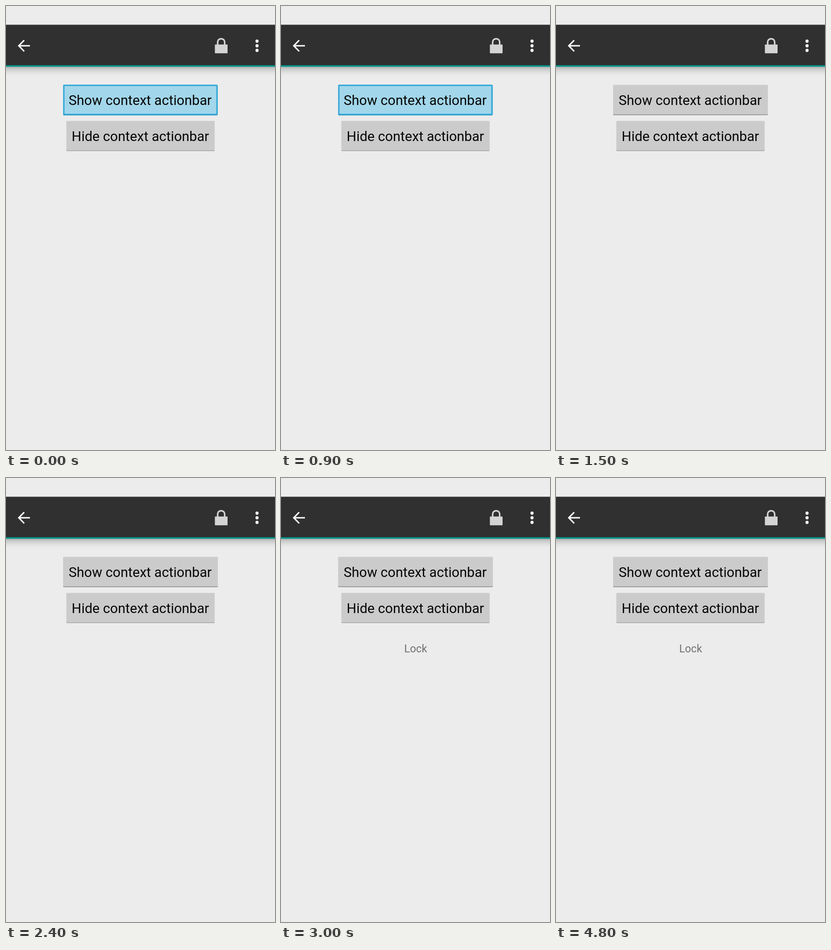
Write an HTML page that moves like this. It is 584 px wide and 960 px high and loops after 6 s.

```html
<!DOCTYPE html>
<html lang="en">
<head>
<meta charset="utf-8">
<title>Context actionbar</title>
<style>
  html, body { margin: 0; width: 100%; height: 100%; overflow: hidden; background: #ececec; }
  svg { display: block; width: 584px; height: 960px; }
  text { font-family: Roboto, sans-serif; font-size: 29.6px; fill: #060606; }
  .toast { font-size: 23.2px; fill: #707070; animation: toast 6s step-end infinite; }
  .pressed { animation: press 6s step-end infinite; }
  @keyframes press { 0% { visibility: visible; } 25%, 100% { visibility: hidden; } }
  @keyframes toast { 0% { visibility: hidden; } 50%, 100% { visibility: visible; } }
</style>
</head>
<body>
<svg viewBox="0 0 584 960">
  <defs>
    <linearGradient id="shadow" x2="0" y2="1">
      <stop offset="0" stop-color="#b4b4b4"/>
      <stop offset=".35" stop-color="#d2d2d2"/>
      <stop offset=".7" stop-color="#e5e5e5"/>
      <stop offset="1" stop-color="#ececec"/>
    </linearGradient>
  </defs>
  <rect width="584" height="960" fill="#ececec"/>

  <g id="bar">
    <rect y="131" width="584" height="21" fill="url(#shadow)"/>
    <rect y="40.5" width="584" height="88" fill="#303030"/>
    <rect y="128" width="584" height="3.5" fill="#099488"/>
    <path d="M52 86H28M39.5 74L27.8 86L39.5 98" fill="none" stroke="#fff" stroke-width="3.2"/>
    <path d="M459.5 84V78a7.6 7.3 0 0 1 15.2 0V84" fill="none" stroke="#d4d4d4" stroke-width="3.4"/>
    <rect x="453.5" y="83.3" width="27.5" height="19" rx=".8" fill="#d4d4d4"/>
    <g fill="#fff">
      <circle cx="545" cy="76" r="3.4"/>
      <circle cx="545" cy="86" r="3.4"/>
      <circle cx="545" cy="96" r="3.4"/>
    </g>
  </g>

  <g id="show">
    <rect x="124" y="171" width="336" height="65" rx="2" fill="#8b8b8b"/>
    <rect x="124" y="170.5" width="336" height="64" rx="2" fill="#cbcbcb"/>
    <g class="pressed">
      <rect x="123" y="169" width="338" height="68" fill="#ececec"/>
      <rect x="124" y="171" width="335.5" height="65.5" rx="2" fill="#258bb5"/>
      <rect x="124" y="170" width="335.5" height="65.5" rx="2" fill="#33a9d9"/>
      <rect x="127" y="173" width="329.5" height="60" fill="#a2d6ea"/>
    </g>
    <text x="136" y="214">Show context actionbar</text>
  </g>

  <g id="hide">
    <rect x="131" y="249" width="322" height="64.5" rx="2" fill="#8b8b8b"/>
    <rect x="131" y="248.5" width="322" height="64" rx="2" fill="#cbcbcb"/>
    <text x="142.6" y="292">Hide context actionbar</text>
  </g>

  <text class="toast" x="267.6" y="376.5">Lock</text>
</svg>
</body>
</html>
```
